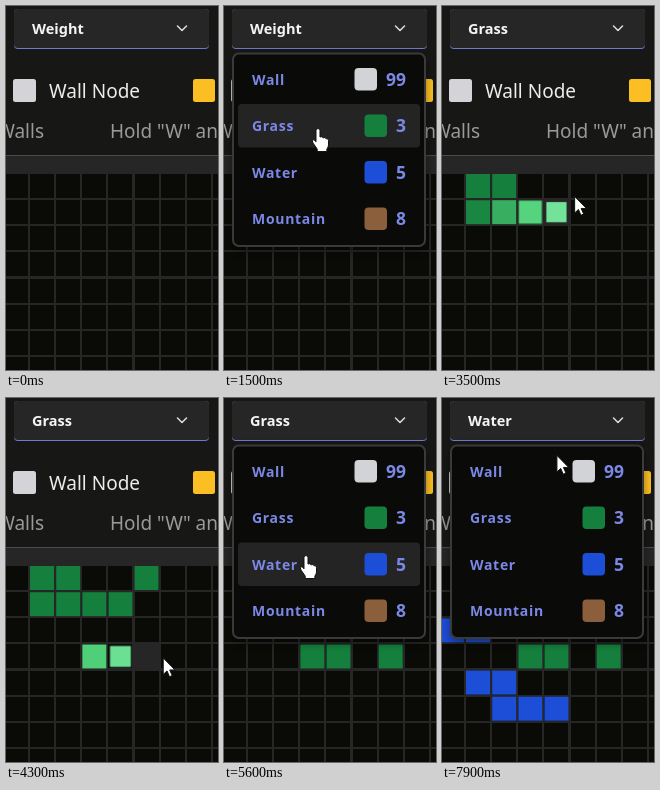
Recreate the animation shown at these times as an HTML page. Size 212 by 364 pixels, loop 8000 ms.

```html
<!DOCTYPE html>
<html lang="en">
<head>
<meta charset="utf-8">
<title>Weighted grid</title>
<style>
  html, body { margin: 0; width: 100%; height: 100%; overflow: hidden; background: #171715; }
  svg { display: block; width: 100%; height: 100%; font-family: "Noto Sans", "Open Sans", sans-serif; }
  text { white-space: pre; }
  .label { font-size: 14.5px; font-weight: 700; fill: #f5f5f5; }
  .legend { font-size: 19px; fill: #ececec; }
  .hint { font-size: 19px; fill: #9a9a9a; }
  .item { font-size: 14px; font-weight: 600; letter-spacing: .7px; fill: #7b88e6; }
  .cost { font-size: 17.5px; font-weight: 600; fill: #7b88e6; text-anchor: end; }
  .paint { transform-box: fill-box; transform-origin: center; }
  #menu { filter: drop-shadow(0 4px 5px rgba(0, 0, 0, .4)); }
</style>
</head>
<body>
<svg viewBox="0 0 212 364">
  <rect width="212" height="364" fill="#171715"/>
  <g id="select">
    <rect x="8" y="3" width="195" height="40" rx="4" fill="#7078d0"/>
    <path d="M8 7a4 4 0 0 1 4-4h187a4 4 0 0 1 4 4v31a4 4 0 0 1-4 4H12a4 4 0 0 1-4-4Z" fill="#262626"/>
    <text id="label" class="label" x="26" y="28"></text>
    <path d="M171.5 20l4.5 4.5l4.5-4.5" fill="none" stroke="#d8d8d8" stroke-width="1.6" stroke-linecap="round" stroke-linejoin="round"/>
  </g>
  <rect x="7" y="73" width="23" height="23" rx="2.5" fill="#d4d4d8"/>
  <text class="legend" x="43" y="92">Wall Node</text>
  <rect x="187" y="73" width="22" height="23" rx="2.5" fill="#fbbf24"/>
  <text class="hint" x="38" y="132" text-anchor="end">Walls</text>
  <text class="hint" x="104" y="132">Hold "W" and</text>
  <rect y="149" width="212" height="215" fill="#262626"/>
  <rect y="149" width="212" height="1" fill="#4b4b4b"/>
  <g id="grid"></g>
  <g id="menu">
    <rect x="9" y="47.5" width="192" height="192.5" rx="6" fill="#0a0b08" stroke="#3a3a3a" stroke-width="2"/>
    <rect id="active" x="14" width="182" height="43.5" rx="4" fill="#242424"/>
  </g>
  <g id="cursor" fill="#fff" stroke="#111" stroke-linejoin="round">
    <path id="arrow" d="M0 0V16.5L3.8 13L6.3 18.8L9 17.6L6.5 12H11.8Z"/>
    <path id="hand" d="M-2 1.6a2 2 0 0 1 4 0V8q2-1 3.2 .8q2-.9 3 .9q2.3-.5 2.3 1.8v4.5q0 2-1.6 4v2.5H-.8V20L-5 14q-1.6-2.6 .4-3.2q1.4 0 2.6 2Z"/>
  </g>
</svg>
<script>
const LOOP = 8000, LAG = 35, FADE = 100, GROW = 500;
const SIZE = 24, PITCH = 26.15, STEP = 130, ROW = 46.5;
const $ = id => document.getElementById(id);

const add = (parent, tag, attrs, text = "") => {
  const el = document.createElementNS("http://www.w3.org/2000/svg", tag);
  for (const k in attrs) el.setAttribute(k, attrs[k]);
  el.textContent = text;
  return parent.appendChild(el);
};
const show = (el, on) => el.setAttribute("visibility", on ? "visible" : "hidden");
const clamp = v => Math.max(0, Math.min(1, v));
const ease = p => p * p * (3 - 2 * p);

const cellX = c => 24 + PITCH * (c - 1);
const cellY = r => 168 + PITCH * r;
const box = (x, y, attrs) => add($("grid"), "rect", { x, y, width: SIZE, height: SIZE, ...attrs });

const cells = [];
for (let r = 0; r < 8; r++)
  for (let c = 0; c < 9; c++) {
    const x = Math.round(cellX(c)), y = Math.round(cellY(r));
    cells.push({ x, y, el: box(x, y) });
  }

// Each run paints `count` cells to the right, one per STEP.
const brushes = [
  { colors: ["#86efac", "#4fcf78", "#15803d"],
    runs: [{ at: 2750, c: 1, r: 0, count: 2 }, { at: 3020, c: 1, r: 1, count: 4 }, { at: 3560, c: 5, r: 0, count: 1 },
           { at: 4050, c: 3, r: 3, count: 2 }, { at: 4350, c: 6, r: 3, count: 1 }] },
  { colors: ["#00c4e0", "#3a9abf", "#1d4ed8"],
    runs: [{ at: 6350, c: 0, r: 2, count: 2 }, { at: 6700, c: 1, r: 4, count: 2 }, { at: 6940, c: 2, r: 5, count: 3 }] }
];

const paints = brushes.flatMap(({ colors, runs }) => runs.flatMap(run =>
  Array.from({ length: run.count }, (_, i) => {
    const at = run.at + i * STEP, x = cellX(run.c + i), y = cellY(run.r);
    const el = box(x, y, { class: "paint" });
    const grow = el.animate(colors.map((fill, k) => ({ fill, transform: `scale(${k ? 1 : .75})` })),
      { delay: at, duration: GROW, fill: "both" });
    grow.pause();
    return { at, x, y, el, grow };
  })));

// The pointer visits every painted cell, and these stops in between.
const stops = [
  [150, 225, 12], [650, 130, 25], [1500, 94, 123], [1880, 92, 125],
  [2600, 45, 186], [3750, 130, 128], [5200, 128, 26], [5600, 82, 158],
  [5850, 80, 162], [6600, 47, 292], [7750, 128, 28], [LOOP, 108, 73]
].map(([at, x, y]) => ({ at, x, y }));
const route = [...stops, ...paints.map(p => ({ at: p.at, x: p.x + 13, y: p.y + 13.5 }))]
  .sort((a, b) => a.at - b.at);

function pointer(t) {
  const i = Math.max(1, route.findIndex(s => s.at > t));
  const a = route[i - 1], b = route[i];
  const p = ease(clamp((t - a.at) / (b.at - a.at)));
  return [a.x + (b.x - a.x) * p, a.y + (b.y - a.y) * p];
}

const openings = [{ from: 700, to: 1880 }, { from: 5200, to: 5850 }, { from: 7750, to: LOOP + FADE }];
const labelAt = t => t < openings[0].to ? "Weight" : t < openings[1].to ? "Grass" : "Water";

const itemTop = i => 51.5 + ROW * i;
[["Wall", 99, "#d1d3d6"], ["Grass", 3, "#15803d"], ["Water", 5, "#1d4ed8"], ["Mountain", 8, "#8b5e3c"]]
  .forEach(([name, cost, fill], i) => {
    const y = itemTop(i);
    add($("menu"), "text", { class: "item", x: 28, y: Math.round(y + 27) }, name);
    add($("menu"), "rect", { x: cost > 9 ? 130.5 : 140.5, y: y + 10.5, width: 22.5, height: 22.5, rx: 4, fill });
    add($("menu"), "text", { class: "cost", x: 182, y: Math.round(y + 28) }, cost);
  });

function draw(t) {
  const [x, y] = pointer(t);
  const [hx, hy] = pointer(t - LAG);
  const open = openings.some(o => t >= o.from && t < o.to);
  $("label").textContent = labelAt(t);

  const within = (v, start) => v >= start && v < start + SIZE + 2;
  for (const cell of cells) {
    const hot = !open && within(hx, cell.x) && within(hy, cell.y);
    cell.el.setAttribute("fill", hot ? "#262626" : "#0a0b07");
  }
  for (const { at, el, grow } of paints) {
    show(el, t >= at);
    grow.currentTime = t;
  }

  const alpha = Math.max(...openings.map(o =>
    Math.min(clamp((t - o.from) / FADE), clamp(1 - (t - o.to) / FADE))));
  $("menu").style.opacity = alpha;

  const item = Math.floor((hy - itemTop(0)) / ROW);
  const onItem = open && item >= 0 && item < 4 && hx > 14 && hx < 196;
  $("active").setAttribute("y", itemTop(onItem ? item : 0));
  $("active").setAttribute("opacity", onItem ? 1 : 0);

  const onSelect = hx > 8 && hx < 203 && hy > 3 && hy < 43;
  $("cursor").setAttribute("transform", `translate(${x} ${y})`);
  show($("hand"), onItem || onSelect);
  show($("arrow"), !onItem && !onSelect);
}

const start = performance.now();
function tick() {
  draw((performance.now() - start) % LOOP);
  requestAnimationFrame(tick);
}
tick();
</script>
</body>
</html>
```
